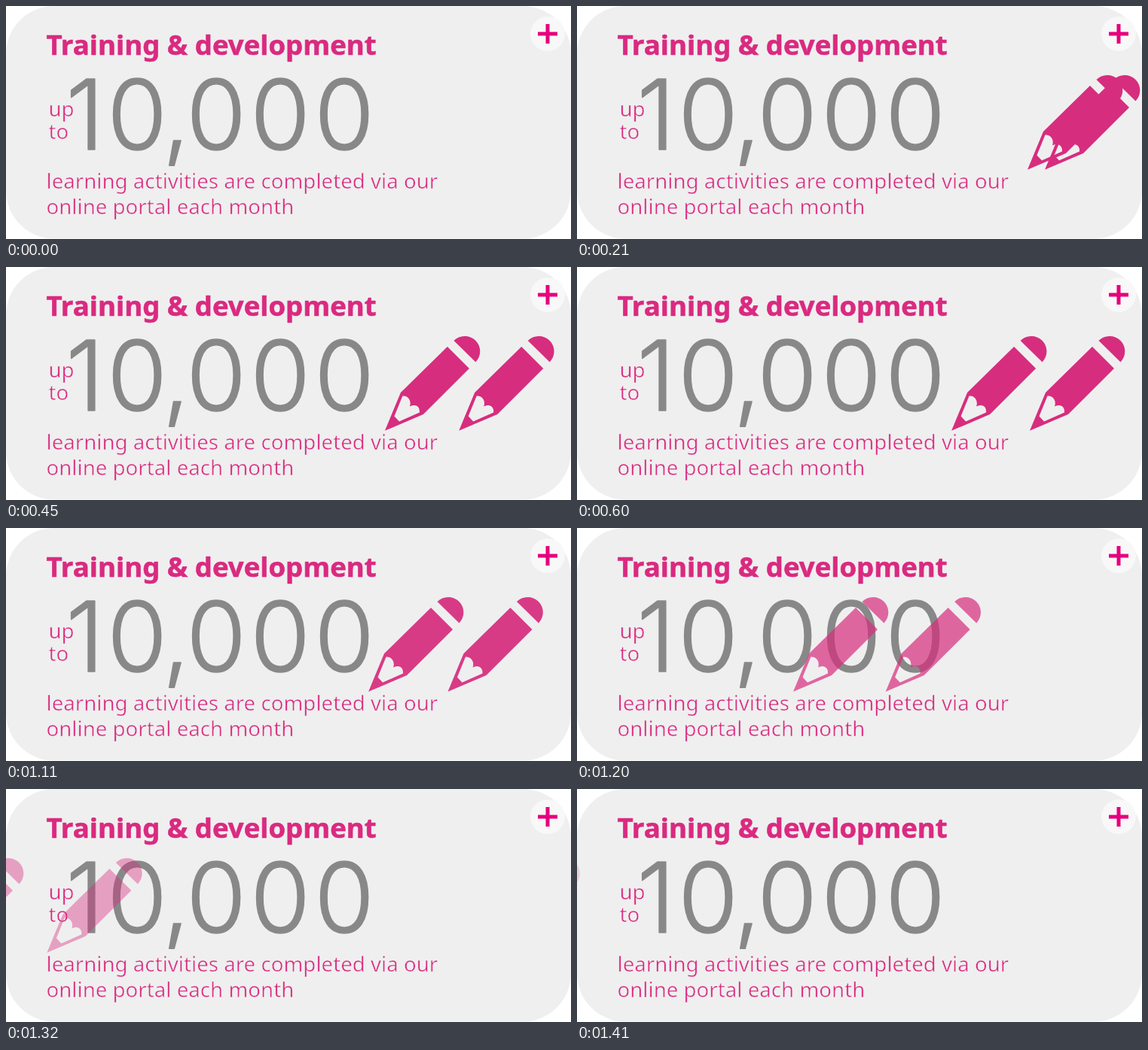
An HTML page for the animation above (1440 ms loop, 750 by 310 pixels).

```html
<!DOCTYPE html>
<html lang="en">
<head>
<meta charset="utf-8">
<title>Training &amp; development</title>
<style>
  html, body { margin: 0; width: 100%; height: 100%; overflow: hidden; background: #fff; }
  svg { display: block; width: 750px; height: 310px; }
  text { fill: #da2a80; font-family: "Noto Sans", sans-serif; stroke-linejoin: round; }
  .title { font-size: 36.6px; font-weight: 700; stroke: #da2a80; stroke-width: .6; }
  /* a card-coloured outline thins the letters */
  .copy text { font-size: 27.7px; font-weight: 300; stroke: #efefef; stroke-width: .6; }
  .count {
    font: 300 129px Inter, sans-serif; font-optical-sizing: none;
    fill: #888; stroke: #888; stroke-width: 1.4; text-anchor: middle;
  }
  .pencil { fill: #d72d7e; fill-rule: evenodd; }
</style>
</head>
<body>
<svg viewBox="0 0 750 310">
  <defs>
    <!-- x = 0 is the point of the pencil -->
    <g id="pencil">
      <path d="M91.5 98 A20 20 0 0 1 120.5 126.5 Z"/>
      <path d="M83 106 L112 135 L51 196 L0 217.8 L21 167 Z
               M23.5 171.5 L12.5 198.5 L19 205.5 L46 193.5
               Q46.5 185 39.5 184 Q36 183.5 33 185.5
               Q35 180 32 175.5 Q29 171 23.5 171.5 Z"/>
    </g>
  </defs>

  <rect width="750" height="309.5" rx="64" fill="#efefef"/>
  <circle cx="719" cy="37" r="23" fill="#f8f8f8"/>
  <path d="M706 37 H732 M719 24 V50" stroke="#e6007e" stroke-width="5"/>

  <text class="title" x="53.5" y="65">Training &amp; development</text>
  <text class="count" x="105 174 226 279 364 449" y="191.3">10,000</text>
  <g class="copy">
    <text x="56.5" y="147">up</text>
    <text x="56.5" y="177">to</text>
    <text x="53.5" y="242.5">learning activities are completed via our</text>
    <text x="53.5" y="276.5">online portal each month</text>
  </g>

  <use class="pencil" href="#pencil"/>
  <use class="pencil" href="#pencil"/>
</svg>
<script>
  const LOOP = 1440, STEP = 30, EXIT = 1080, FADE = 0.9;
  const nodes = document.querySelectorAll('.pencil');

  // enter: distance still to travel at time 0, duration and ease-out power
  const pencils = [
    { rest: 497, enter: 439, duration: 683, power: 4, exit: 810 },
    { rest: 601, enter: 161, duration: 616, power: 5, exit: 738 }
  ];

  const smooth = p => p * p * (3 - 2 * p);

  function draw(time) {
    const leaving = Math.max(0, (time - EXIT) / (LOOP - EXIT));
    pencils.forEach((pencil, i) => {
      const remaining = Math.max(0, 1 - time / pencil.duration) ** pencil.power;
      const x = pencil.rest + pencil.enter * remaining - pencil.exit * smooth(leaving);
      nodes[i].setAttribute('transform', `translate(${x.toFixed(2)} 0)`);
      nodes[i].setAttribute('opacity', 1 - FADE * leaving);
    });
  }

  const start = performance.now();

  function tick() {
    const elapsed = (performance.now() - start + 1) % LOOP;
    draw(Math.floor(elapsed / STEP) * STEP);
    requestAnimationFrame(tick);
  }
  tick();
</script>
</body>
</html>
```
